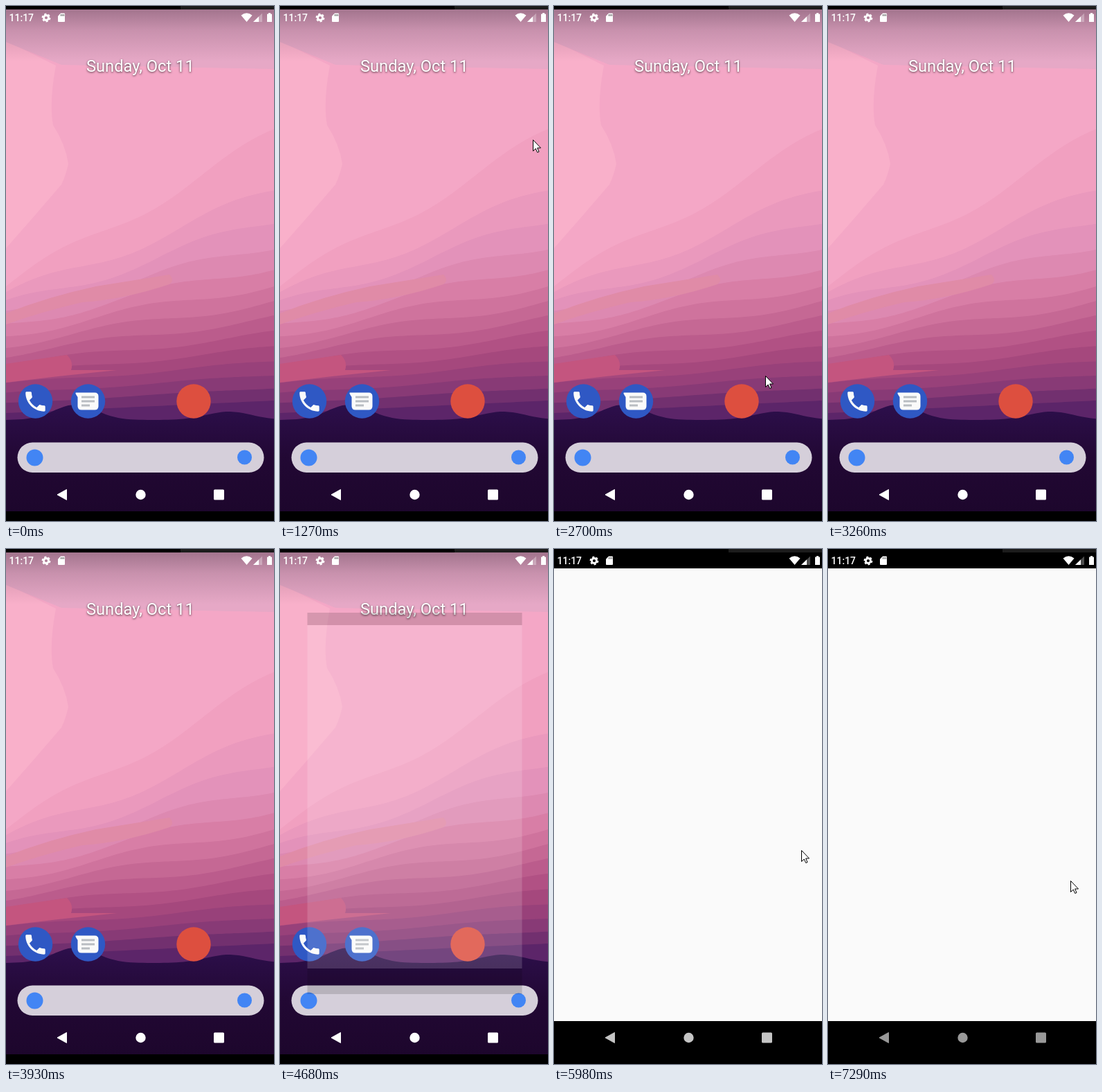
An HTML page that plays this animation: 387 px wide and 744 px high, repeating every 8000 ms.

```html
<!DOCTYPE html>
<html lang="en">
<head>
<meta charset="utf-8">
<title>Launching an app</title>
<style>
  html, body { margin: 0; width: 100%; height: 100%; overflow: hidden; background: #000; }
  svg { display: block; width: 387px; height: 744px; font-family: Roboto, sans-serif; }
  .date { font-size: 23.7px; fill: #fff; filter: drop-shadow(0 1px 1.5px #000a); }
  .clock { font-size: 14px; font-weight: 500; }
</style>
</head>
<body>
<svg viewBox="0 0 387 744">
  <defs>
    <linearGradient id="shade" x1="0" y1="0" x2="0" y2="1">
      <stop offset="0" stop-color="#201020" stop-opacity=".34"/>
      <stop offset=".4" stop-color="#201020" stop-opacity=".15"/>
      <stop offset="1" stop-color="#201020" stop-opacity="0"/>
    </linearGradient>
    <linearGradient id="dusk" x1="0" y1="0" x2="0" y2="1">
      <stop offset="0" stop-color="#2d0f4c"/>
      <stop offset=".45" stop-color="#220834"/>
      <stop offset="1" stop-color="#1c062b"/>
    </linearGradient>
    <clipPath id="screen"><rect y="5" width="387" height="725"/></clipPath>
  </defs>
  <rect width="387" height="744"/>

  <g id="home" clip-path="url(#screen)">
    <rect width="387" height="744" fill="#f4a7c6"/>
    <path fill="#f9b0ca" d="M0 50L72 86Q62 140 68 172Q86 200 90 228Q86 246 80 258Q40 305 0 350Z"/>
    <path fill="#e6a8c6" d="M0 0H387V91L80 85L0 52Z"/>
    <g id="bands"></g>
    <path fill="#e08ba7" d="M0 444Q60 420 130 405L236 388Q244 396 236 402Q170 424 110 428Q50 442 0 460Z"/>
    <path fill="#c4557f" d="M0 517L88 504Q98 514 94 526L160 526Q80 534 0 544Z"/>
    <path id="hills" fill="url(#dusk)"/>
    <rect y="5" width="387" height="75" fill="url(#shade)"/>
    <text class="date" x="116" y="95">Sunday, Oct 11</text>

    <g fill="#2f58c4">
      <circle cx="42.5" cy="571" r="24.7"/>
      <circle cx="118.5" cy="571" r="24.7"/>
    </g>
    <path fill="#fafafa" transform="translate(23.5 552.5) scale(1.58)" d="M6.6 10.8c1.4 2.8 3.8 5.1 6.6 6.6l2.2-2.2c.3-.3.7-.4 1-.2 1.1.4 2.3.6 3.6.6.6 0 1 .4 1 1V20c0 .6-.4 1-1 1C10.6 21 3 13.4 3 4c0-.6.4-1 1-1h3.5c.6 0 1 .4 1 1 0 1.2.2 2.4.6 3.6.1.3 0 .7-.3 1z"/>
    <path fill="#fafafa" d="M101 558.5H128Q133.500 558.500 133.500 564V578Q133.500 583.500 128 583.500H109Q103.500 583.500 103.500 578V565Q99 558.500 101 558.500Z"/>
    <path stroke="#b9bdc2" stroke-width="3" d="M109 565H128M109 571H128M109 577H121"/>
    <circle cx="271" cy="571" r="24.7" fill="#dd4f3f"/>

    <rect x="16.5" y="630.5" width="356" height="43.5" rx="21.7" fill="#d5cfda"/>
    <g fill="#4285f4">
      <circle cx="41.5" cy="652.5" r="12"/>
      <circle cx="344.5" cy="652" r="10.5"/>
    </g>
  </g>

  <g id="opening">
    <path opacity=".14" d="M39.5 92h310v18h-310zM39.5 606h310v37h-310z"/>
    <rect x="39.5" y="110" width="310" height="496" fill="#fff" opacity=".15"/>
  </g>

  <g id="app">
    <rect width="387" height="744"/>
    <rect y="28" width="387" height="654" fill="#fafafa"/>
  </g>

  <rect x="252" width="135" height="5" fill="#1c1c1c"/>

  <g fill="#fff">
    <text class="clock" x="4.5" y="22">11:17</text>
    <g fill="none" stroke="#fff">
      <circle cx="58" cy="17" r="3.5" stroke-width="2.8"/>
      <circle cx="58" cy="17" r="5.4" stroke-width="2" pathLength="12" stroke-dasharray="1.1 .9"/>
    </g>
    <path d="M79 10.5H84Q85 10.5 85 11.5V22Q85 23 84 23H76Q75 23 75 22V14.5Z"/>
    <path stroke="#555" d="M79.5 12V14.5M81.5 12V14.5M83.5 12V14.5"/>
    <path d="M339.5 13.5Q347.5 7 355.5 13.5L347.5 23Z"/>
    <path opacity=".3" d="M357 23L370 10.5V23Z"/>
    <path d="M357 23L365 15.3V23Z"/>
    <path d="M379 10H382V11.5H384V23H377V11.5H379Z"/>
  </g>

  <g id="nav" fill="currentColor">
    <path stroke="currentColor" stroke-linejoin="round" d="M74 706L87.5 698.5V713.5Z"/>
    <circle cx="194.5" cy="706" r="7.2"/>
    <rect x="300" y="698.5" width="15" height="15" rx="1.5"/>
  </g>

  <path id="cursor" fill="#fff" stroke="#000" d="M.5 .5V16.5L4.2 13L6.7 18.5L9 17.5L6.6 12H11.5Z"/>
</svg>
<script>
const LOOP = 8000, WIDTH = 387;
const TICK = 132;
const LAUNCH = 4680, LAUNCHED = 4830, DIM = 5550;

const byId = id => document.getElementById(id);
const show = (id, on) => byId(id).setAttribute('visibility', on ? 'visible' : 'hidden');
const lerp = (a, b, p) => a + (b - a) * p;
const clamp = p => Math.min(1, Math.max(0, p));

// Area below the curve y = height(x).
function below(height) {
  let d = 'M0 744';
  for (let x = 0; x < WIDTH + 6; x += 6) d += `L${x} ${height(x).toFixed(1)}`;
  return d + 'V744Z';
}

const dusk = ['#f1a0c0', '#e291b9', '#d67ba3', '#c06290', '#aa4a7e', '#8c3c77', '#5c2569'];
const channels = hex => [1, 3, 5].map(i => parseInt(hex.slice(i, i + 2), 16));

function duskColor(u) {
  const pos = u * (dusk.length - 1), i = Math.min(dusk.length - 2, Math.floor(pos));
  const next = channels(dusk[i + 1]);
  return `rgb(${channels(dusk[i]).map((c, k) => Math.round(lerp(c, next[k], pos - i)))})`;
}

// Cloud bands fan out to the right and flatten towards the horizon.
function band(u) {
  const left = 405 + 183 * u, right = 185 + 385 * u ** 0.6;
  const edge = x => lerp(left, right, x / WIDTH) - 10 * (1 - u) * Math.sin(x / 45 + u * 9);
  return `<path fill="${duskColor(u)}" d="${below(edge)}"/>`;
}

const BANDS = 14;
byId('bands').innerHTML = Array.from({ length: BANDS }, (_, i) => band(i / (BANDS - 1))).join('');

const bump = (x, center, spread) => Math.exp(-(((x - center) / spread) ** 2));
byId('hills').setAttribute('d', below(x => 598 - 22 * bump(x, 100, 44) - 12 * bump(x, 322, 46)));

const moves = [
  { at: 1270, until: 1390, from: [365, 193] },
  { at: 1390, until: 1780, from: [21, 129], to: [21, 6], steps: 3 },
  { at: 2310, until: 2430, from: [216, 40] },
  { at: 2430, until: 2700, from: [367, 285], to: [345, 420], steps: 2 },
  { at: 2700, until: 3260, from: [305, 534], to: [290, 618], steps: 4, ease: 2 },
  { at: 3400, until: 3930, from: [329, 682], to: [323, 734], steps: 4 },
  { at: 5390, until: 5550, from: [215, 511] },
  { at: 5550, until: 7160, from: [345, 435], to: [357, 435], steps: 2 },
  { at: 7160, until: LOOP, from: [355, 457], to: [350, 479], steps: 2 },
];

function pointerAt(t) {
  const move = moves.find(m => t >= m.at && t < m.until);
  if (!move) return null;
  const { at, from, to = from, steps = 2, ease = 1 } = move;
  const p = clamp(Math.floor((t - at + 15) / TICK) / (steps - 1)) ** ease;
  return from.map((v, i) => Math.round(lerp(v, to[i], p)));
}

function draw(t) {
  show('opening', t >= LAUNCH && t < LAUNCHED);
  show('app', t >= LAUNCHED);

  const dimmed = clamp((Math.floor((t - DIM) / TICK) + 1) / 7);
  const grey = Math.round(lerp(255, 153, dimmed));
  byId('nav').setAttribute('color', `rgb(${grey},${grey},${grey})`);

  const place = pointerAt(t);
  show('cursor', place);
  if (place) byId('cursor').setAttribute('transform', `translate(${place})`);
}

const start = performance.now();
function tick() {
  draw((performance.now() - start) % LOOP);
  requestAnimationFrame(tick);
}
tick();
</script>
</body>
</html>
```
